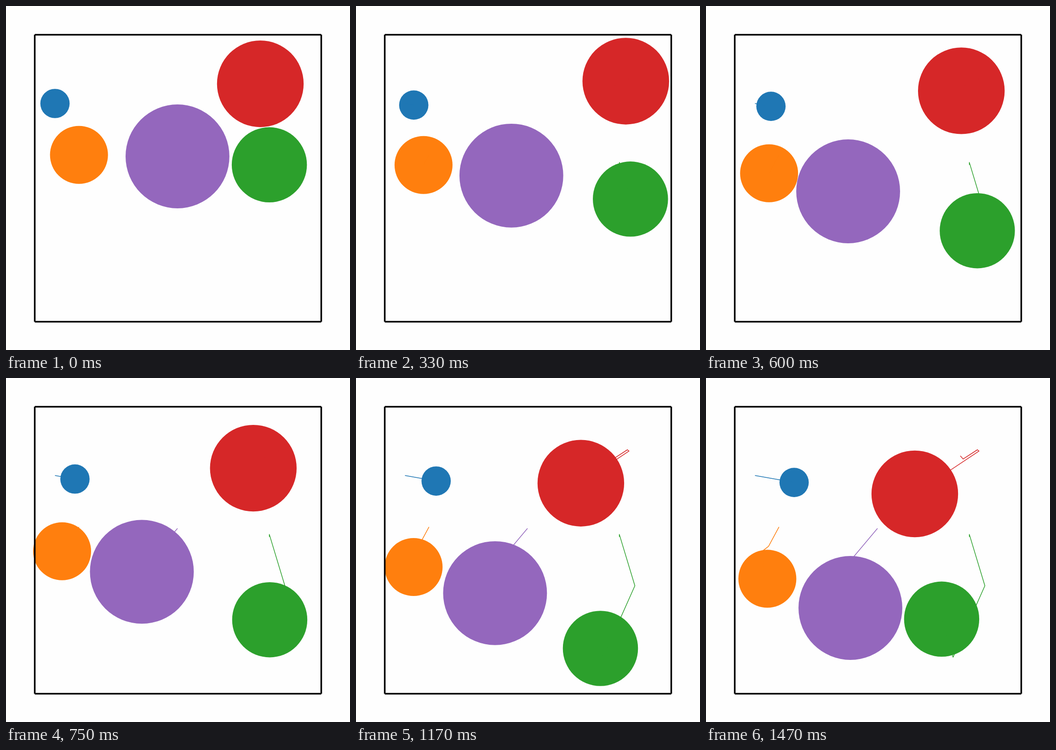
Animation, 748 px wide and 748 px high, one loop 1500 ms. Source, as an HTML page with a canvas:

```html
<!DOCTYPE html>
<html lang="en">
<head>
<meta charset="utf-8">
<title>Bouncing discs</title>
<style>
  html, body { margin: 0; width: 100%; height: 100%; overflow: hidden; background: #fefefe; }
  canvas { display: block; }
</style>
</head>
<body>
<canvas width="748" height="748"></canvas>
<script>
const ctx = document.querySelector('canvas').getContext('2d');
const SIZE = 748, STEP = 30, STEPS = 50;
const UNIT = SIZE / 1.2;   // side of the box
const EDGE = 0.69;         // half the outline width of a disc
const BOX = { left: 62.5, top: 62.5, right: 685.5, bottom: 686.5 };

// Discs move straight and evenly between collisions: each bounce is [step, x, y].
const discs = [
  { color: '#1f77b4', radius: 0.05, bounces: [[0, 106.5, 212], [49, 191.6, 227.1]] },
  { color: '#ff7f0e', radius: 0.1, bounces: [
    [0, 158.7, 323.8], [21, 136.1, 365.8], [25, 122, 376.8], [32, 127.6, 392],
    [37, 123.6, 406], [49, 133.4, 436.5]] },
  { color: '#2ca02c', radius: 0.13, bounces: [
    [0, 572.6, 345.3], [1, 572.6, 340.1], [15, 606.4, 451.7], [36, 537.2, 607.1],
    [49, 512.4, 524.3]] },
  { color: '#d62728', radius: 0.15, bounces: [
    [0, 553, 169.2], [1, 559.2, 176.2], [8, 590.2, 156], [9, 593.6, 158.8],
    [49, 454, 252]] },
  { color: '#9467bd', radius: 0.18, bounces: [
    [0, 372.9, 327], [21, 305.9, 406.8], [26, 292.8, 425], [32, 294.2, 445.3],
    [49, 314, 500]] }
];

// Points travelled up to a step, ending at the current centre.
function travelled(bounces, step) {
  const next = Math.max(1, bounces.findIndex(b => b[0] >= step));
  const [s0, x0, y0] = bounces[next - 1], [s1, x1, y1] = bounces[next];
  const k = (step - s0) / (s1 - s0);
  const past = bounces.slice(0, next).map(([, x, y]) => [x, y]);
  return [...past, [x0 + (x1 - x0) * k, y0 + (y1 - y0) * k]];
}

function polyline(points, color, width) {
  ctx.beginPath();
  for (const [x, y] of points) ctx.lineTo(x, y);
  ctx.strokeStyle = color;
  ctx.lineWidth = width;
  ctx.stroke();
}

function disc([x, y], radius, color) {
  ctx.beginPath();
  ctx.arc(x, y, radius * UNIT + EDGE, 0, 2 * Math.PI);
  ctx.fillStyle = color;
  ctx.fill();
}

function drawBox({ left, top, right, bottom }) {
  for (const y of [top, bottom]) polyline([[left, y], [right, y]], '#000', 3.5);
  for (const x of [left, right]) polyline([[x, top], [x, bottom]], '#000', 3.5);
}

function draw(step) {
  ctx.fillStyle = '#fefefe';
  ctx.fillRect(0, 0, SIZE, SIZE);
  ctx.lineJoin = 'round';
  const trails = discs.map(d => travelled(d.bounces, step));
  discs.forEach((d, i) => disc(trails[i].at(-1), d.radius, d.color));
  discs.forEach((d, i) => polyline(trails[i], d.color, 1.5));
  drawBox(BOX);
}

const start = performance.now();
function tick() {
  draw(Math.floor((performance.now() - start) / STEP) % STEPS);
  requestAnimationFrame(tick);
}
tick();
</script>
</body>
</html>
```
